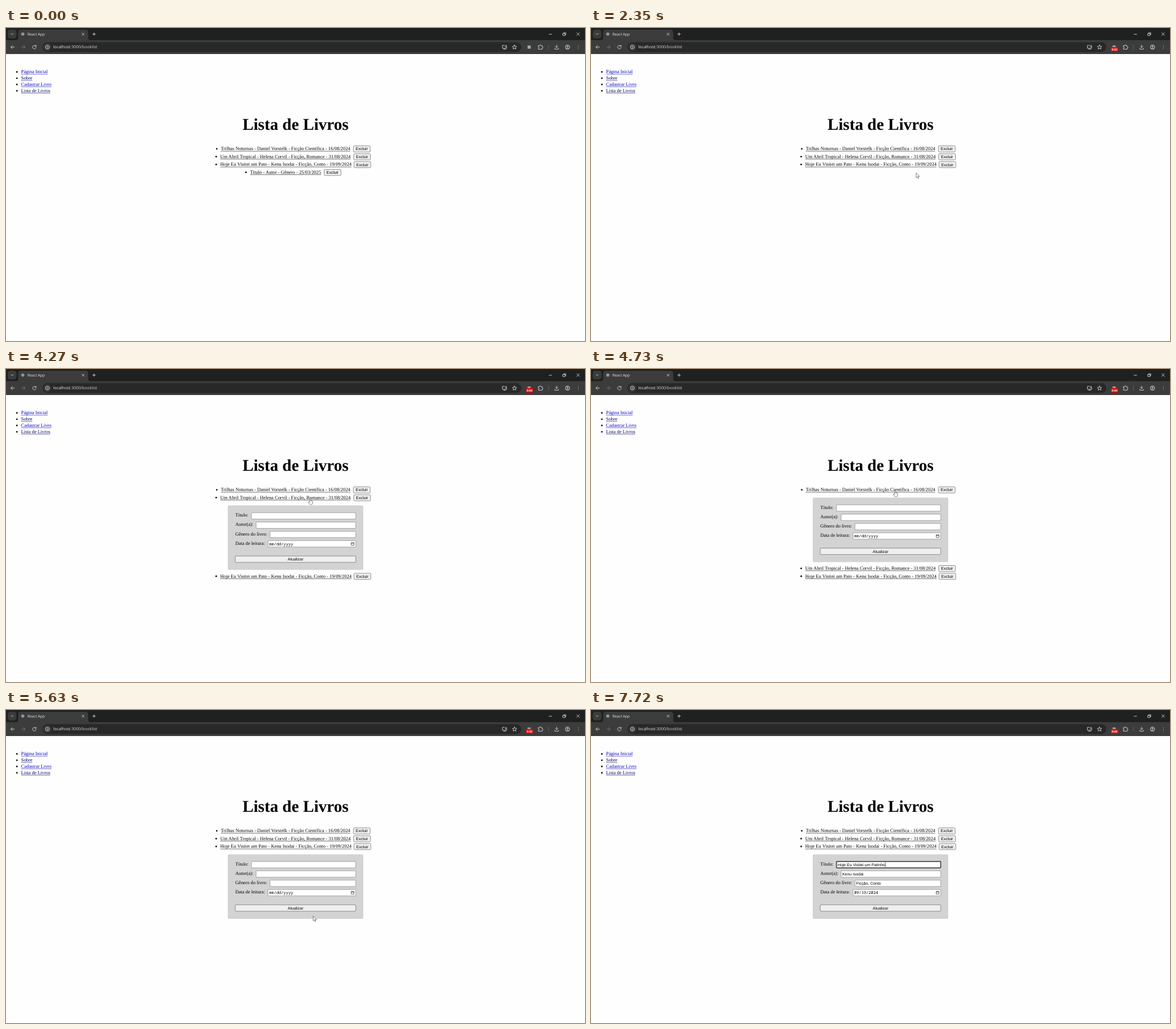
An HTML page that plays this animation: 1000x541 px, repeating every 8000 ms.

```html
<!DOCTYPE html>
<html lang="pt">
<head>
<meta charset="utf-8">
<title>React App</title>
<style>
  html, body { margin: 0; width: 100%; height: 100%; overflow: hidden; background: #fefefe; }
  svg { display: block; }
  text { text-rendering: geometricPrecision; white-space: pre; }
  .serif { font: 8.33px "Liberation Serif", serif; }
  .sans { font: 6.94px "Liberation Sans", sans-serif; }
  .mono { font: 6.94px "Noto Sans Mono", monospace; }
  .ui { font: 6.4px "Open Sans", sans-serif; fill: #ececec; }
  .mid { text-anchor: middle; }
  .line { fill: none; stroke: #d6d6d6; stroke-width: .9; stroke-linecap: round; stroke-linejoin: round; }
  .box { fill: #fff; stroke: #767676; stroke-width: .6; }
  .btn { fill: #efefef; stroke: #707070; stroke-width: .75; }
  .btn.hover { fill: #d9d9d9; }
  .focus { stroke: #101010; stroke-width: 1.2; }
  .pointer { fill: #fff; stroke: #333; stroke-width: .6; stroke-linejoin: round; }
</style>
</head>
<body>
<svg width="1000" height="541" viewBox="0 0 1000 541">
  <!-- browser frame -->
  <rect width="1000" height="22" fill="#1f2020"/>
  <rect y="21" width="1000" height="24" fill="#3c3c3c"/>
  <rect x="3" y="3" width="15" height="15" rx="4.5" fill="#3a3b3b"/>
  <path d="M17 21q4 0 4-4V8q0-5 5-5H137q5 0 5 5v9q0 4 4 4z" fill="#3c3c3c"/>
  <circle cx="29" cy="10.5" r="2.8" fill="#8a9a9e"/>
  <text class="ui" x="37" y="12.8">React App</text>
  <rect x="63" y="24.5" width="827" height="17" rx="8.5" fill="#282828"/>
  <circle cx="71.5" cy="33" r="6.5" fill="#3c3c3c"/>
  <text class="ui" x="81.5" y="35.3" style="font-size:7.05px">localhost<tspan fill="#d0d0d0">:3000/booklist</tspan></text>
  <g class="line">
    <path d="M8.8 9.6l1.9 1.9 1.9-1.9M131.4 8.8l3.6 3.6m0-3.6l-3.6 3.6M149.6 10.6h5m-2.5-2.5v5"/>
    <path d="M938 10.8h4.4M962 9.4h3.6v3.6H962zM963.2 9.2V8.2h3.6v3.6h-1M985.8 8.2l4.6 4.6m0-4.6l-4.6 4.6"/>
    <path d="M14.6 33H8.6m2.7-2.8L8.5 33l2.8 2.8"/>
    <path d="M27 33h6m-2.7-2.8L33.1 33l-2.8 2.8" stroke="#777"/>
    <path d="M51.6 31.3a3.1 3.1 0 1 0 .5 2.2M52 29.7v2h-2"/>
    <circle cx="71.5" cy="33" r="3.2"/>
    <path d="M71.5 32.8v1.7M71.5 31.3v.1"/>
    <path d="M861 30h-3.6v5h7.4v-1.6M859.4 36.6h3.6M863.6 29.4v3.4m-1.5-1.4l1.5 1.5 1.5-1.5"/>
    <path d="M878.3 29.3l1.1 2.5 2.7.2-2.1 1.8.7 2.7-2.4-1.5-2.4 1.5.7-2.7-2.1-1.8 2.7-.2z"/>
    <path d="M919.6 30.6h2q0-1.6 1.2-1.6t1.2 1.6h2v2q1.5 0 1.5 1.1T926 34.9v1.8h-6.4v-2q1.4-.2 1.4-1.1t-1.4-1z"/>
    <path d="M937 29.5v7" stroke="#666"/>
    <path d="M951 29.4v4.4m-2-1.9l2 2 2-2M947.8 35v1.6h6.4V35"/>
    <circle cx="969.8" cy="33" r="3.7"/>
    <circle cx="969.8" cy="32" r="1.2"/>
    <path d="M967.5 35.6q2.3-2 4.6 0M988.5 30.3v.1M988.5 33v.1M988.5 35.7v.1"/>
  </g>
  <rect x="900.8" y="30.3" width="5.4" height="5.4" fill="#a8a8a8"/>
  <g id="badge">
    <rect x="898" y="32.8" width="12.4" height="8" rx="1.6" fill="#d90d0d"/>
    <text id="clock" class="mid" x="904.2" y="38.6" fill="#fff" style="font:bold 5px 'Open Sans',sans-serif"></text>
  </g>

  <!-- page -->
  <g id="nav" class="serif"></g>
  <text class="mid" x="500" y="175.5" style="font:bold 28.5px 'Liberation Serif',serif">Lista de Livros</text>
  <g id="list"></g>
  <g id="form">
    <rect x="383" width="234" height="111.5" rx="2.5" fill="#d3d3d3"/>
    <g id="fields"></g>
    <rect class="btn" x="396" y="87.4" width="208" height="11" rx=".8"/>
    <text class="sans mid" x="500" y="95.5">Atualizar</text>
    <path d="M596.2 64.3h4.8v4.5h-4.8zM596.2 65.2h4.8" fill="none" stroke="#222" stroke-width=".7"/>
    <path id="caret" d="M0 14v8" stroke="#000" stroke-width=".6"/>
  </g>
  <g id="pointer" class="pointer">
    <path id="arrow" d="M0 0V8.5L2 6.7 3.3 9.8 4.6 9.2 3.3 6.3H6Z"/>
    <path id="hand" d="M-.9.8a.9.9 0 0 1 1.8 0V4l2.6.7q1 .3.9 1.3L3.9 9q-.3 1.8-2 1.8H.3q-1 0-1.5-.8L-3.3 7q-.4-1 .5-1.2.8 0 1.9 1Z"/>
    <path id="beam" d="M-1.4-4h2.8M0-4V4M-1.4 4h2.8"/>
  </g>
</svg>
<script>
const LOOP = 8000, ROW_Y = 208.5, PITCH = 13.55, FORM_GAP = 122.3, FILL_DELAY = 180;
const $ = id => document.getElementById(id);
const show = (node, on) => node.setAttribute('display', on ? 'inline' : 'none');
const move = (node, x, y) => node.setAttribute('transform', `translate(${x} ${y})`);

const books = [
  { title: 'Trilhas Noturnas', author: 'Daniel Vorstelk', genre: 'Ficção Científica', date: '16/08/2024', x: 371, btn: 600 },
  { title: 'Um Abril Tropical', author: 'Helena Corvil', genre: 'Ficção, Romance', date: '31/08/2024', x: 370, btn: 600.5 },
  { title: 'Hoje Eu Visitei um Pato', author: 'Kenu Isodai', genre: 'Ficção, Conto', date: '19/09/2024', x: 370, btn: 601 },
  { title: 'Título', author: 'Autor', genre: 'Gênero', date: '25/03/2025', x: 421.5, btn: 549.5 },
];
const REMOVE_AT = 2240, FOCUS_AT = 6970;
const opens = [[3770, 2], [4270, 1], [4730, 0], [5530, 2]];
const ticks = [480, 970, 1930, 2900, 3900, 4900, 5900, 6970, 7720];
const typing = [[7320, 'Pat'], [7480, 'Pati'], [7560, 'Patin'], [7640, 'Patinh'], [7720, 'Patinho']];

// time, x, y, shape kept until the next stop
const path = [
  [560, 800, 130, 'arrow'], [890, 600, 215, 'arrow'], [970, 564, 248, 'hand'], [1160, 557.5, 250.5, 'hand'],
  [1300, 558, 254, 'hand'], [1550, 558, 254, 'hand'], [1820, 559, 252, 'hand'], [2240, 559, 252, 'arrow'],
  [2500, 565, 248, 'arrow'], [2800, 608, 239, 'hand'], [2980, 612, 236, 'hand'], [3060, 575, 240, 'hand'],
  [3210, 573, 240, 'hand'], [3500, 545, 239, 'hand'], [3590, 531, 238.5, 'hand'], [4070, 531, 238.5, 'hand'],
  [4270, 525.5, 223.5, 'hand'], [4550, 525.5, 223.5, 'hand'], [4730, 525.5, 210, 'hand'], [4900, 525.5, 210, 'arrow'],
  [5050, 525.5, 319.5, 'arrow'], [5300, 528, 345, 'arrow'], [5400, 530.5, 356, 'hand'], [5530, 530.5, 356, 'arrow'],
  [5640, 530.5, 356, 'arrow'], [6030, 545, 287, 'arrow'], [6170, 540, 284, 'arrow'], [6500, 500, 306, 'arrow'],
  [6760, 486, 288, 'arrow'], [6970, 486, 268, 'beam'], [7320, 486, 268, ''],
];

['Página Inicial', 'Sobre', 'Cadastrar Livro', 'Lista de Livros'].forEach((label, i) => {
  const y = 78.2 + i * 10.9;
  $('nav').innerHTML += `<circle cx="18.8" cy="${y - 2.3}" r="1.4"/>
    <text class="link" x="26" y="${y}" fill="${i % 2 ? '#00005c' : '#0000c0'}">${label}</text>`;
});

$('list').innerHTML = books.map(b => `<g>
  <circle cx="${b.x - 7}" cy=".3" r="1.4"/>
  <text class="serif link" x="${b.x}" y="2.7" fill="#000">${[b.title, b.author, b.genre, b.date].join(' - ')}</text>
  <rect class="btn" x="${b.btn}" y="-4.8" width="29" height="10.6" rx="1.4"/>
  <text class="sans mid" x="${b.btn + 14.5}" y="2.9">Excluir</text></g>`).join('');
const rows = [...$('list').children];

// hairline underlines, thinner than a text decoration can be
document.querySelectorAll('.link').forEach(text => {
  const x = +text.getAttribute('x'), y = +text.getAttribute('y') + 1.5;
  text.insertAdjacentHTML('afterend',
    `<rect x="${x}" y="${y}" width="${text.getComputedTextLength()}" height=".55" fill="${text.getAttribute('fill')}"/>`);
});

const fields = [['Título:', 424], ['Autor(a):', 432], ['Gênero do livro:', 456], ['Data de leitura:', 452.5]];
$('fields').innerHTML = fields.map(([label, x], i) => {
  const y = 18 + i * 16.1;
  return `<text class="serif" x="396" y="${y + 1.5}">${label}</text>
    <rect class="box" x="${x}" y="${y - 5.5}" width="${604 - x}" height="11" rx=".8"/>
    <text class="value ${i < 3 ? 'sans' : 'mono'}" x="${x + 1.9}" y="${y + 2.6}"></text>`;
}).join('');
const values = [...document.querySelectorAll('.value')];
const titleBox = document.querySelector('.box');

const last = (list, t) => list.filter(e => e[0] <= t).pop();

function pointerAt(t) {
  const a = last(path, t);
  if (!a) return { shape: '' };
  const b = path[path.indexOf(a) + 1] || a;
  const k = b === a ? 0 : (t - a[0]) / (b[0] - a[0]);
  return { x: a[1] + (b[1] - a[1]) * k, y: a[2] + (b[2] - a[2]) * k, shape: a[3] };
}

function formValues(t, open) {
  if (t < open[0] + FILL_DELAY) return ['', '', '', 'mm/dd/yyyy'];
  const b = books[open[1]], [d, m, y] = b.date.split('/');
  const typed = last(typing, t);
  return [typed ? b.title.replace('Pato', typed[1]) : b.title, b.author, b.genre, `${m}/${d}/${y}`];
}

function draw(t) {
  const p = pointerAt(t), open = last(opens, t);

  const seconds = ticks.filter(s => s <= t).length - 1;
  show($('badge'), seconds >= 0);
  $('clock').textContent = `0:0${Math.max(0, seconds)}`;

  rows.forEach((row, i) => {
    const y = ROW_Y + i * PITCH + (open && i > open[1] ? FORM_GAP : 0);
    const hover = p.shape === 'hand' && Math.abs(p.x - books[i].btn - 14.5) < 14.5 && Math.abs(p.y - y) < 6;
    move(row, 0, y);
    row.querySelector('.btn').classList.toggle('hover', hover);
  });
  show(rows[3], t < REMOVE_AT);

  show($('form'), open);
  if (open) {
    move($('form'), 0, ROW_Y + open[1] * PITCH + 13.8);
    formValues(t, open).forEach((v, i) => values[i].textContent = v);
  }
  const focus = t >= FOCUS_AT;
  titleBox.classList.toggle('focus', focus);
  show($('caret'), focus);
  if (focus) move($('caret'), 426.3 + values[0].getComputedTextLength(), 0);

  ['arrow', 'hand', 'beam'].forEach(s => show($(s), s === p.shape));
  if (p.shape) move($('pointer'), p.x, p.y);
}

function frame() {
  draw(performance.now() % LOOP);
  requestAnimationFrame(frame);
}
frame();
</script>
</body>
</html>
```
